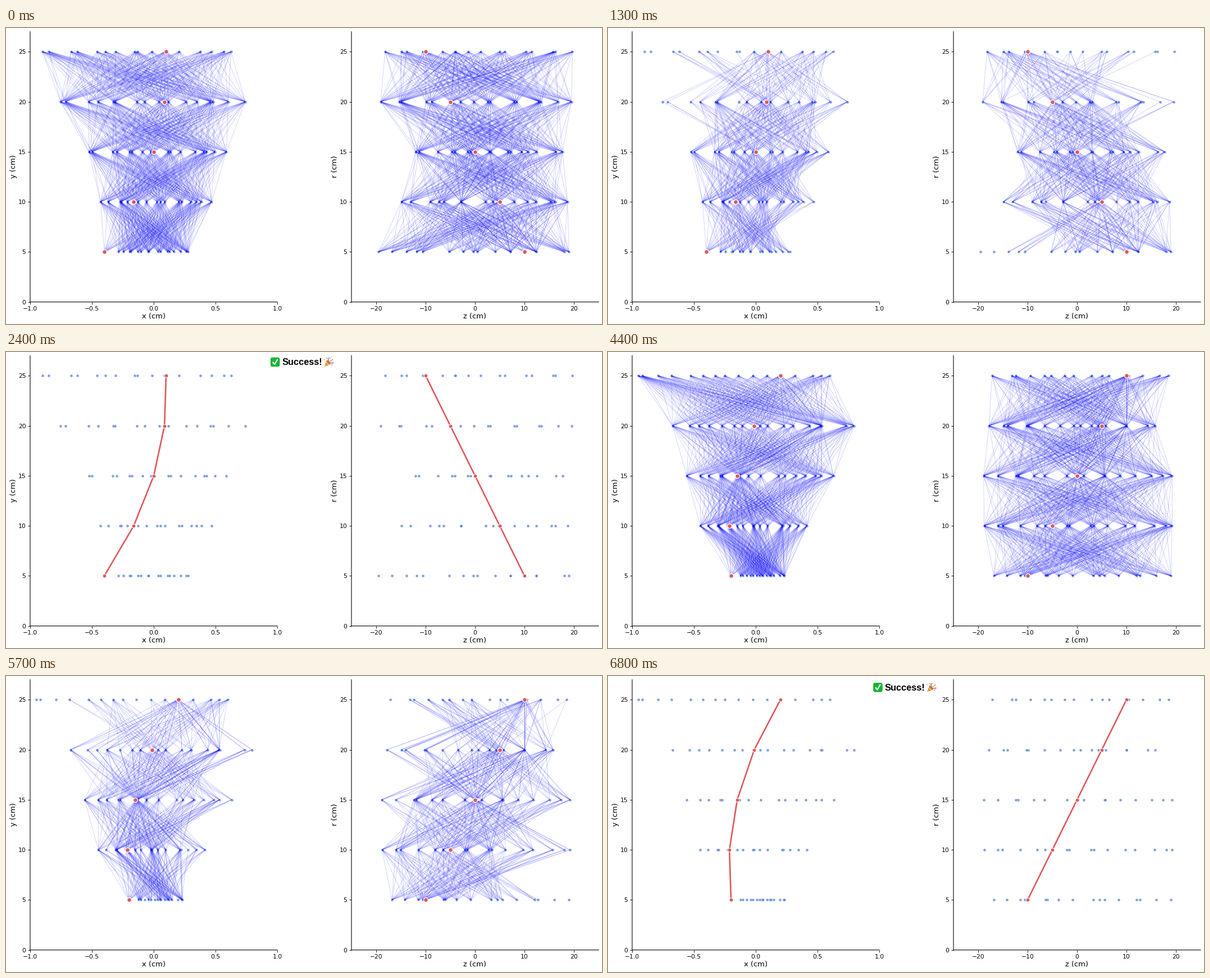
Write a matplotlib script that moves like this. It is 1061 px wide and 528 px high and loops after 8000 ms.

```python
import numpy as np
import matplotlib.pyplot as plt
from matplotlib.animation import FuncAnimation
from matplotlib.collections import LineCollection
from matplotlib.patches import Circle, Ellipse, FancyBboxPatch, Polygon

W, H, DPI = 1061, 528, 100
PX = 72 / DPI                      # one pixel in points
STEPS, SEARCH_FRAMES, EVENT_FRAMES = 20, 24, 44
RADII = np.arange(5, 26, 5)
NOISE_HITS = 16                    # per layer
BLUE, RED = "#4878cf", "#dc585b"

plt.rcParams["font.family"] = "DejaVu Sans"
fig = plt.figure(figsize=(W / DPI, H / DPI), dpi=DPI, facecolor="white")


def make_axes(left, xlim, ticks, xlabel, ylabel):
    top, bottom, width = 6.5, 488.7, 440
    ax = fig.add_axes([left / W, 1 - bottom / H, width / W, (bottom - top) / H])
    ax.set(xlim=xlim, ylim=(0, 27), xticks=ticks, yticks=range(0, 26, 5))
    ax.patch.set_visible(False)
    for side, spine in ax.spines.items():
        spine.set_visible(side in ("left", "bottom"))
        spine.set_linewidth(1.1 * PX)
        spine.set_snap(False)
    ax.tick_params(labelsize=10.8 * PX, length=3.8 * PX, width=0.9 * PX, pad=3.8 * PX)
    style = dict(fontsize=13 * PX, ha="center", va="center")
    fig.text((left + width / 2) / W, 1 - 514.5 / H, xlabel, **style)
    fig.text((left - 29.5) / W, 1 - 247.5 / H, ylabel, rotation=90, **style)
    return ax


def scatter(rng, low, high):
    """Uneven spread of hits from low to high, in random order."""
    u = np.arange(NOISE_HITS) + rng.uniform(-0.7, 0.7, NOISE_HITS)
    u[0], u[-1] = 0, NOISE_HITS - 1
    u = np.clip(u / (NOISE_HITS - 1), 0, 1)
    return low + (high - low) * rng.permutation(u)


class View:
    """One projection of an event: hits, candidate edges and the true track."""

    def __init__(self, ax, rng, lows, highs, truth):
        hits = [scatter(rng, lo, hi) for lo, hi in zip(lows, highs)]
        self.dots, = ax.plot(np.concatenate(hits), np.repeat(RADII, NOISE_HITS), "o",
                             color=BLUE, alpha=0.7, ms=5 * PX, mec="white",
                             mew=0.5 * PX, zorder=2, clip_on=False)
        self.edges = LineCollection([], colors="blue", alpha=0.21, linewidths=0.8 * PX,
                                    zorder=3)
        ax.add_collection(self.edges, autolim=False)
        mark = dict(color=RED, mec="white", zorder=5, clip_on=False)
        self.seeds, = ax.plot(truth, RADII, "o", ms=8 * PX, mew=1.4 * PX, **mark)
        self.track, = ax.plot(truth, RADII, "-o", lw=2.6 * PX, ms=6.8 * PX,
                              mew=1.0 * PX, **mark)
        self.link([np.append(h, t) for h, t in zip(hits, truth)], truth)

    def link(self, layers, truth):
        """Join all hits of neighbouring layers; cost is the distance from the track."""
        segments, cost = [], []
        for k in range(len(RADII) - 1):
            for a in layers[k]:
                for b in layers[k + 1]:
                    segments.append([(a, RADII[k]), (b, RADII[k + 1])])
                    cost.append(abs(a - truth[k]) + abs(b - truth[k + 1]))
        self.segments = np.array(segments)
        self.cost = np.array(cost) / max(cost)


class Event:
    """A set of hits seen in both projections; an edge must pass the cut in each."""

    def __init__(self, seed, x, z):
        rng = np.random.default_rng(seed)
        self.views = [View(ax_x, rng, *x), View(ax_z, rng, *z)]
        self.cost = np.maximum(*[v.cost for v in self.views])

    def show(self, active, step, found):
        searching = active and not found
        keep = self.cost <= (1 - step / STEPS) ** 0.7
        for view in self.views:
            view.dots.set_visible(active)
            view.edges.set_visible(searching)
            view.seeds.set_visible(searching)
            view.track.set_visible(active and found)
            if searching:
                view.edges.set_segments(view.segments[keep])


overlay = fig.add_axes([0, 0, 1, 1])
overlay.set(xlim=(0, W), ylim=(H, 0))
overlay.axis("off")


def make_banner(dx, dy):
    """Tick box, caption and party popper, shifted by (dx, dy) pixels."""
    def patch(p):
        return overlay.add_patch(p)

    def stroke(points, color, width):
        x, y = np.array(points).T
        return overlay.plot(x + dx, y + dy, color=color, lw=width * PX,
                            solid_capstyle="round", solid_joinstyle="round")[0]

    parts = [
        patch(FancyBboxPatch((473.2 + dx, 12 + dy), 11.8, 11.8,
                             boxstyle="round,pad=2,rounding_size=3", fc="#10b832",
                             ec="#0a9a28", lw=0.6 * PX)),
        stroke([(475.2, 18.4), (478, 22), (483.2, 13.4)], "white", 2.2),
        overlay.text(491.5 + dx, 23.4 + dy, "Success!", fontsize=16.4 * PX,
                     family="Liberation Sans", weight="bold", va="baseline"),
        patch(Polygon(np.array([(567.2, 25.6), (571, 15), (577.4, 21.6)]) + (dx, dy),
                      fc="#f6bd45", ec="#c98a2b", lw=0.5 * PX)),
        patch(Ellipse((574.2 + dx, 18.3 + dy), 9, 3.6, angle=46, fc="#b9772c")),
        stroke([(569.4, 20.6), (571.8, 23.8)], "#d4574e", 1.2),
        stroke([(573.5, 17), (574.6, 14.5), (573.2, 12.6), (574.4, 10.6)], "#d9546a", 1.3),
        stroke([(575.5, 18), (578, 15.6), (579.4, 16), (581.6, 12.8)], "#e8a33a", 1.3),
        stroke([(576.4, 20), (578.8, 19), (580.4, 20.4), (582.8, 19.4)], "#8a6fc9", 1.3),
    ]
    colors = ["#e8a33a", "#5aa7dd", "#8a6fc9", "#e0566a", "#5aa7dd", "#e0566a"]
    for angle, color in zip(np.linspace(-2.5, 0.7, len(colors)), colors):
        spot = (573.5 + 8.5 * np.cos(angle) + dx, 18 + 7.5 * np.sin(angle) + dy)
        parts.append(patch(Circle(spot, 0.9, fc=color)))
    return parts


ax_x = make_axes(43, (-1, 1), [-1, -0.5, 0, 0.5, 1], "x (cm)", "y (cm)")
ax_z = make_axes(615, (-25, 25), range(-20, 21, 10), "z (cm)", "r (cm)")

# For each projection: lowest hit, highest hit and true hit per layer.
events = [
    Event(4,
          x=([-0.285, -0.43, -0.525, -0.754, -0.9],
             [0.278, 0.468, 0.588, 0.741, 0.625],
             [-0.4, -0.162, 0, 0.087, 0.1]),
          z=([-19.5, -14.9, -12, -19.1, -18.2],
             [19, 18.7, 17.7, 19.5, 19.7],
             10 - 5 * np.arange(5))),
    Event(9,
          x=([-0.123, -0.448, -0.559, -0.673, -0.952],
             [0.234, 0.414, 0.63, 0.795, 0.598],
             [-0.2, -0.213, -0.15, -0.012, 0.2]),
          z=([-16.8, -18.8, -18.9, -17.8, -17.2],
             [19, 19.2, 19.2, 15.8, 18.5],
             5 * np.arange(5) - 10)),
]
banners = [make_banner(0, 0), make_banner(1.3, 2.4)]


def draw(frame):
    current, t = divmod(frame, EVENT_FRAMES)
    step, found = min(t, STEPS - 1), t >= SEARCH_FRAMES
    for i, (event, banner) in enumerate(zip(events, banners)):
        event.show(i == current, step, found)
        for part in banner:
            part.set_visible(i == current and found)
    return []


anim = FuncAnimation(fig, draw, frames=80, interval=100, init_func=lambda: draw(0),
                     repeat=True, repeat_delay=0, blit=False)
plt.show()
```
